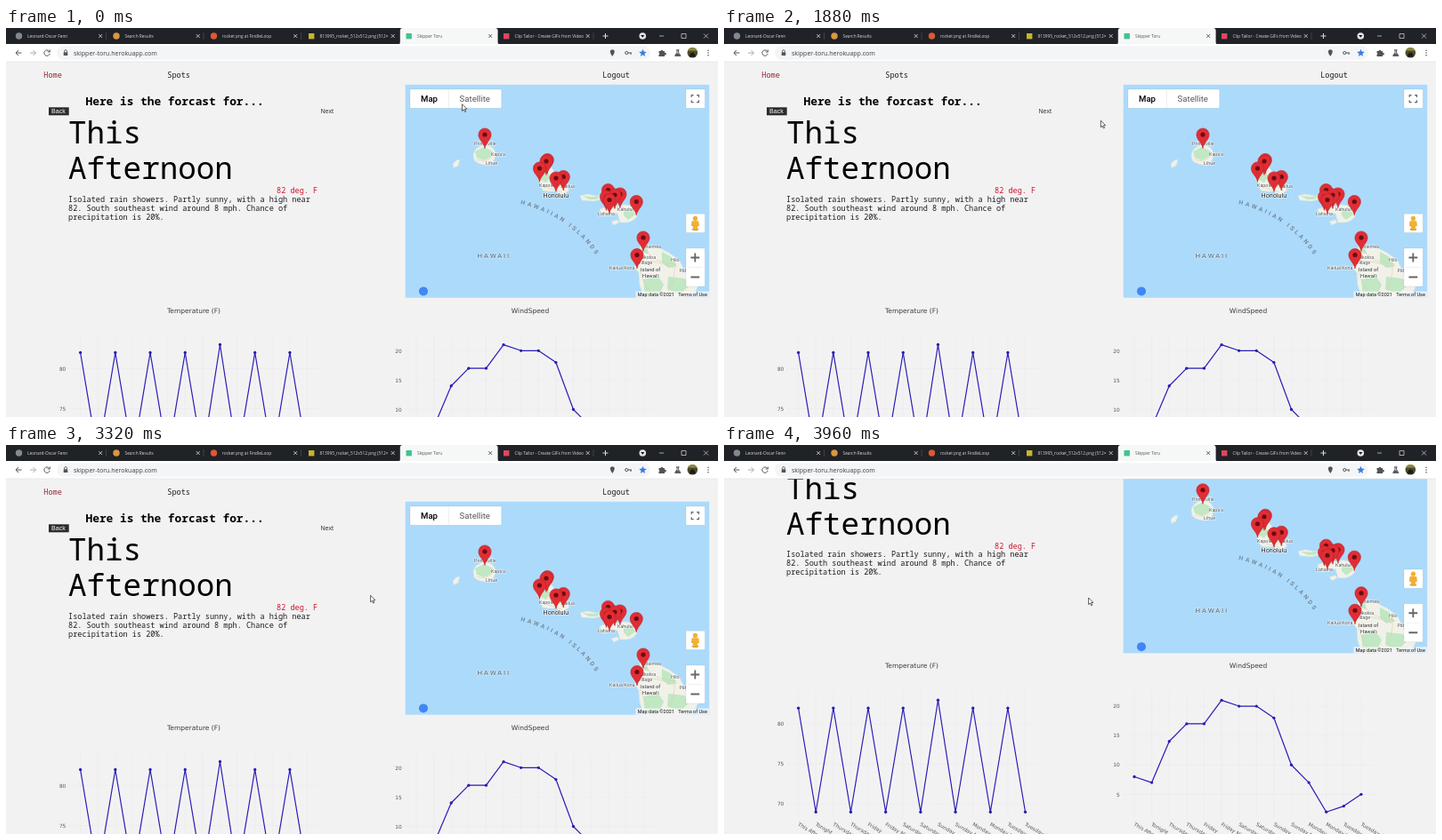
Write an HTML page that moves like this. It is 800 px wide and 438 px high and loops after 4 s.

```html
<!DOCTYPE html>
<html lang="en">
<head>
<meta charset="utf-8">
<title>Forecast page</title>
<style>
  html, body { margin: 0; width: 100%; height: 100%; overflow: hidden; background: #f3f2f3; }
  svg { display: block; width: 100%; height: 100%; }
  text { white-space: pre; }
  .mono { font-family: "Noto Sans Mono", monospace; font-size: 8.56px; fill: #1c1c1e; }
  .mono .home { fill: #8f2a32; }
  .mono .heading { font-size: 12.84px; font-weight: 700; fill: #000; }
  .mono .period { font-size: 34.24px; fill: #000; }
  .mono .degrees { fill: #c9182c; }
  .button { font: 7.1px "Liberation Sans", sans-serif; }
  .map { font-family: Roboto, sans-serif; }
  .place { font-size: 5.4px; fill: #555; stroke: #fff; stroke-width: 1.2px; stroke-opacity: .8; paint-order: stroke; }
  .place.city { font-size: 7.2px; fill: #222; }
  .place.island { font-size: 5.8px; fill: #222; }
  .region { font-weight: 500; fill: #6c7b88; }
  .chart { font-family: "DejaVu Sans", sans-serif; font-size: 5.8px; fill: #555; }
  .chart .title { font-size: 7.5px; fill: #3c3c3c; text-anchor: middle; }
  .grid { stroke: #e9e9ec; stroke-width: .6; }
  .series { fill: none; stroke: #281db4; stroke-width: 1.2; stroke-linejoin: round; }
  .tab { font: 4.8px "Open Sans", sans-serif; fill: #d8d8d8; }
  .tab .active { fill: #555; }
  .icon { fill: none; stroke: #50545a; stroke-width: 1; }
  .card { fill: #fff; stroke: #0002; stroke-width: .5; }
</style>
</head>
<body>
<svg viewBox="0 0 800 438">
  <defs>
    <clipPath id="mapArea"><rect x="448.7" y="63.7" width="341.5" height="240"/></clipPath>
    <path id="chain" d="M578 198Q638 213 668 264"/>
    <g id="pin">
      <path d="M0 15.4C-.8 9-7.1 6 -7.1 0A7.1 7.1 0 0 1 7.1 0C7.1 6 .8 9 0 15.4Z" fill="#e12d34" stroke="#b5222a" stroke-width=".6"/>
      <circle r="2.6" fill="#6b0d12"/>
    </g>
  </defs>

  <rect width="800" height="438" fill="#f3f2f3"/>

  <g id="page">
    <g class="mono">
      <text class="home" x="42.3" y="55.8">Home</text>
      <text x="181.3" y="55.8">Spots</text>
      <text x="670.2" y="55.8">Logout</text>
      <text class="heading" x="89.5" y="86.5">Here is the forcast for...</text>
      <text class="period" x="70" y="130.3">This</text>
      <text class="period" x="70" y="170.3">Afternoon</text>
      <text class="degrees" x="304" y="186">82 deg. F</text>
      <text x="70" y="195.6">Isolated rain showers. Partly sunny, with a high near</text>
      <text x="70" y="205.6">82. South southeast wind around 8 mph. Chance of</text>
      <text x="70" y="215.6">precipitation is 20%.</text>
    </g>
    <rect x="48" y="89.3" width="22.7" height="9" fill="#2b2b2d"/>
    <text class="button" x="51" y="96.3" fill="#fff">Back</text>
    <text class="button" x="353.4" y="96.3" fill="#333">Next</text>

    <g class="map" clip-path="url(#mapArea)">
      <rect x="448" y="63" width="343" height="241" fill="#acdafb"/>
      <g fill="#f1f1e9" stroke="#d2e4d6" stroke-width=".5">
        <path d="M525 142Q527 134 537 132Q548 132 550 141Q550 150 543 154Q532 155 526 149Z"/>
        <path d="M510 148L508 155L503 157.5L502 153L506 149Z"/>
        <path d="M595 164L602 161L609 153L615 160L619 168L627 171L629 178L633 183L624 188L617 184L609 184L603 183Z"/>
        <path d="M645 189L653 187L663 189L671 188L669 193L660 195L647 194Z"/>
        <path d="M667 204L673 202L678 207L675 212L669 210Z"/>
        <path d="M674 197Q676 190 683 193L687 201L694 199Q704 198 710 209Q708 217 698 219L690 219L687 209L679 208Q673 203 674 197Z"/>
        <path d="M680 218L687 216L689 219L683 222Z"/>
        <path d="M712 240L719 244L733 247L745 253L757 262L764 277L779 287L775 296L758 306H718L712 290L711 276L706 269L713 259Z"/>
      </g>
      <g fill="#c1e7c3">
        <path d="M527 139L537 134L547 139L545 145L537 149L529 146Z"/>
        <path d="M599 164L607 160L612 167L607 174L601 171ZM612 160L617 169L627 174L629 180L619 177Z"/>
        <path d="M648 189L658 190L668 189L664 193L655 193ZM677 195L683 195L685 202L680 203ZM694 203L703 203L707 210L699 216L694 211Z"/>
        <path d="M713 245L720 247L722 254L716 253ZM737 252L748 258L754 268L744 270L737 264ZM716 283L733 280L739 289L732 304L718 303ZM744 280L762 282L770 288L757 300L743 294Z"/>
      </g>
      <path d="M713 250Q722 252 727 258T751 265M712 272Q716 291 731 304M751 265Q753 283 741 303M715 262Q733 262 750 270M606 164Q614 174 628 183M603 178L624 185M529 148Q541 153 548 142" fill="none" stroke="#d9cfae" stroke-width=".6"/>
      <g id="places"></g>
      <text class="region" x="529.5" y="258.7" font-size="8" letter-spacing="1.6" stroke="#fff8" paint-order="stroke">HAWAII</text>
      <text class="region" font-size="6.6" letter-spacing="2.9"><textPath href="#chain">HAWAIIAN ISLANDS</textPath></text>
      <g id="pins"></g>

      <rect class="card" x="454" y="69" width="102.7" height="21.3" rx="1"/>
      <path d="M497.5 69V90" stroke="#e4e4e4" stroke-width=".6"/>
      <text x="466" y="83.1" font-size="9.6" font-weight="500" fill="#000">Map</text>
      <text x="509.6" y="83.1" font-size="9.6" fill="#565656">Satellite</text>
      <g class="card">
        <rect x="764" y="69" width="21.3" height="21.3" rx="1"/>
        <rect x="764" y="209.3" width="21.3" height="21.3" rx="1"/>
        <rect x="764" y="248" width="21.3" height="43" rx="1"/>
      </g>
      <path d="M770.2 78V75.6H772.6M776 75.6H778.4V78M778.4 81.2V83.6H776M772.6 83.6H770.2V81.2" fill="none" stroke="#666" stroke-width="1.2"/>
      <ellipse cx="774.4" cy="226.8" rx="3.8" ry="1.2" fill="#d39a3a"/>
      <g fill="#f0b033"><circle cx="774.4" cy="214.4" r="2.6"/><path d="M770.6 217.3H778.2L779 223H777.2L776.6 227H772.2L771.6 223H769.8Z"/></g>
      <path d="M769.4 258.5H779.2M774.3 253.6V263.4M769.4 280.5H779.2" stroke="#666" stroke-width="1.8"/>
      <path d="M766.5 269.5H782.8" stroke="#e6e6e6" stroke-width=".6"/>
      <circle cx="469" cy="296.4" r="5" fill="#4285f4"/>
      <rect x="707.5" y="296.5" width="83" height="7.5" fill="#f5f5f5" opacity=".8"/>
      <text x="709.8" y="302.2" font-size="5.5" fill="#111">Map data ©2021</text>
      <text x="755.3" y="302.2" font-size="5.5" fill="#111">Terms of Use</text>
    </g>

    <g id="charts" class="chart"></g>
  </g>

  <g id="browser">
    <rect width="800" height="18.5" fill="#1f2227"/>
    <path d="M440 18.5Q442.8 18.5 442.8 16V3Q442.8 0 445.8 0H549.6Q552.6 0 552.6 3V16Q552.6 18.5 555.4 18.5Z" fill="#f6f8f8"/>
    <rect y="18" width="800" height="20" fill="#fff"/>
    <rect x="57" y="20.2" width="667" height="15.6" rx="7.8" fill="#f4f5f6"/>
    <path d="M0 38H800" stroke="#dedfe1" stroke-width=".6"/>
    <g id="tabs" class="tab"></g>
    <path d="M670.5 9H676.5M673.5 6V12" stroke="#ddd"/>
    <circle cx="715.3" cy="9" r="3.8" fill="#e5e5e5"/><path d="M713.2 8H717.4L715.3 10.7Z" fill="#111"/>
    <path d="M734 9H739M759 6.5H764V11.5H759ZM784 6.5L789 11.5M789 6.5L784 11.5" fill="none" stroke="#ddd" stroke-width=".7"/>
    <g class="icon">
      <path d="M17.5 28H11M14 25L11 28L14 31"/>
      <path d="M27 28H33.5M30.5 25L33.5 28L30.5 31" stroke="#a9acb0"/>
      <path d="M48.5 26A3.2 3.2 0 1 0 49.2 28.8M49.3 24.5V27H46.7"/>
      <path d="M65.6 27.4V26A1.4 1.4 0 0 1 68.4 26V27.4" stroke-width=".8"/>
      <circle cx="697.3" cy="28" r="1.6"/><path d="M699 28H703M702 28V30"/>
      <path d="M753 24.8H756.5M754 25V27.5L751.6 31.4H758L755.6 27.5V25"/>
    </g>
    <g fill="#50545a">
      <rect x="64.7" y="27.3" width="4.6" height="3.8" rx=".5"/>
      <path d="M681.3 32Q678.8 28.5 678.8 26.8A2.5 2.5 0 0 1 683.8 26.8Q683.8 28.5 681.3 32Z"/>
      <path d="M733.5 26H735.6A1.3 1.3 0 1 1 738.2 26H740V28A1.3 1.3 0 1 1 740 30.4V32H733.5V30A1.2 1.2 0 0 0 733.5 27.8Z"/>
      <path d="M752.5 30L753.8 28.5H755.8L757.2 31H752Z"/>
      <circle cx="789" cy="25.2" r=".8"/><circle cx="789" cy="28" r=".8"/><circle cx="789" cy="30.8" r=".8"/>
    </g>
    <path d="M715.5 23.8L716.7 26.6L719.8 26.9L717.4 28.9L718.1 31.9L715.5 30.3L712.9 31.9L713.6 28.9L711.2 26.9L714.3 26.6Z" fill="#3b7de0"/>
    <circle cx="771.3" cy="27.8" r="5.8" fill="#4b4a2c"/>
    <path d="M766 25.5A5.8 5.8 0 0 1 776.6 25.5Z" fill="#8d8b3d"/><path d="M768 32.5Q768 28 771.3 27.5Q774.6 28 774.6 32.5Z" fill="#1d1b18"/>
    <text x="76" y="30.6" font-family="Open Sans, sans-serif" font-size="7.03" fill="#3b3e42">skipper-toru.herokuapp.com</text>
  </g>

  <path id="cursor" d="M0 0V7.6L1.8 6L3 8.7L4.2 8.2L3 5.6L5.3 5.4Z" fill="#fff" stroke="#222" stroke-width=".7"/>
</svg>
<script>
const $ = id => document.getElementById(id);

// Browser tabs: [title, icon colour, icon is round]
const tabs = [
  ["Leonard-Oscar Fenn", "#85888c", true],
  ["Search Results", "#d9983f", true],
  ["rocket png at FindleLoop", "#de5833", true],
  ["813995_rocket_512x512.png (512×", "#c9b52e", false],
  ["Skipper Toru", "#3fc48c", false],
  ["Clip Tailor - Create GIFs from Video", "#df4660", false]
];
$("tabs").innerHTML = tabs.map(([title, color, round], i) => {
  const x = 109.5 * i, active = i === 4;
  const icon = round
    ? `<circle cx="${x + 14.5}" cy="9" r="3.7" fill="${color}"/>`
    : `<rect x="${x + 11.5}" y="6" width="6.4" height="6.4" fill="${color}"/>`;
  const divider = i === 3 || active ? "" : `<path d="M${x + 112.5} 5V13" stroke="#55585c" stroke-width=".6"/>`;
  return `${icon}<text class="${active ? "active" : ""}" x="${x + 24}" y="10.8">${title}</text>
    <path d="M${x + 104.2} 7l4 4m0-4l-4 4" stroke="${active ? "#444" : "#ddd"}" stroke-width=".8"/>${divider}`;
}).join("");

// Map labels and markers
const places = [
  ["Princeville", 526, 132], ["Kapa'a", 545, 144], ["Lihue", 539, 153.5], ["Kapolei", 599, 179],
  ["Kailua", 624, 179.5], ["Lahaina", 665, 211], ["Kahului", 687, 206], ["Waimea", 716.5, 247.5],
  ["Waikoloa", 708, 260], ["Village", 710, 265.5], ["Hilo", 747, 263], ["Kailua Kona", 678, 271.5],
  ["Pāhoa", 756.5, 274.5], ["Honolulu", 603.5, 190.7, "city"],
  ["Island of", 713, 274, "island"], ["Hawai'i", 715, 280.8, "island"]
];
$("places").innerHTML = places.map(([name, x, y, kind = ""]) =>
  `<text class="place ${kind}" x="${x}" y="${y}">${name}</text>`).join("");

const pins = [
  [538, 120], [608.3, 148.5], [607, 150], [599.5, 158], [626.3, 167.5], [618, 169], [676.5, 182.5],
  [690, 187], [684, 188], [674.5, 190], [678, 193.5], [708.3, 195.5], [716, 236], [709, 255.5]
];
$("pins").innerHTML = pins.map(([x, y]) => `<use href="#pin" x="${x}" y="${y}"/>`).join("");

// Line charts
const days = ["This Afternoon", "Tonight"];
for (const day of ["Thursday", "Friday", "Saturday", "Sunday", "Monday", "Tuesday"]) days.push(day, day + " Night");

function chart({ title, left, center, values, ticks, toY }) {
  const right = left + 284, top = 346, bottom = 490;
  const toX = i => left + 13.3 + 19.61 * i;
  const points = values.map((v, i) => [toX(i), toY(v)]);
  return `<text class="title" x="${center}" y="320.6">${title}</text>` +
    ticks.map(v => `<path class="grid" d="M${left} ${toY(v)}H${right}"/>
      <text x="${left - 3}" y="${toY(v) + 2.2}" text-anchor="end">${v}</text>`).join("") +
    days.map((day, i) => `<path class="grid" d="M${toX(i)} ${top}V${bottom}"/>
      <text transform="translate(${toX(i) - 1} ${bottom + 7.5}) rotate(30)">${day}</text>`).join("") +
    `<polyline class="series" points="${points.join(" ")}"/>` +
    points.map(([x, y]) => `<circle cx="${x}" cy="${y}" r="1.65" fill="#281db4"/>`).join("");
}
$("charts").innerHTML = chart({
  title: "Temperature (F)", left: 70.3, center: 211, ticks: [70, 75, 80],
  values: days.map((_, i) => i % 2 ? 69 : i === 8 ? 83 : 82),
  toY: v => 383.5 - (v - 80) * 9
}) + chart({
  title: "WindSpeed", left: 447.7, center: 589, ticks: [5, 10, 15, 20],
  values: [8, 7, 14, 17, 17, 21, 20, 20, 18, 10, 7, 2, 3, 5],
  toY: v => 363.3 - (v - 20) * 6.62
});

// Pointer path: [ms, x, y]
const route = [
  [0, 512.5, 85.7], [1000, 436.4, 97.8], [1880, 423.4, 104.2], [3160, 409.6, 169.3],
  [3520, 409.6, 169.3], [3720, 409.6, 170.5], [3960, 409.6, 172], [4000, 409.6, 172]
];
function pointerAt(ms) {
  const i = route.findIndex(([end]) => end > ms);
  const [t0, x0, y0] = route[i - 1], [t1, x1, y1] = route[i];
  const u = (ms - t0) / (t1 - t0), k = u * u * (3 - 2 * u);
  return [x0 + (x1 - x0) * k, y0 + (y1 - y0) * k];
}

// Decelerating wheel scroll near the end of the loop
function scrollAt(ms) {
  const s = Math.max(0, ms - 3400) / 1000;
  return 220 * s - 172 * s * s;
}

function draw() {
  const ms = Math.floor(performance.now() % 4000 / 40) * 40;
  $("page").setAttribute("transform", `translate(0 ${-scrollAt(ms)})`);
  $("cursor").setAttribute("transform", `translate(${pointerAt(ms)})`);
  requestAnimationFrame(draw);
}
draw();
</script>
</body>
</html>
```
